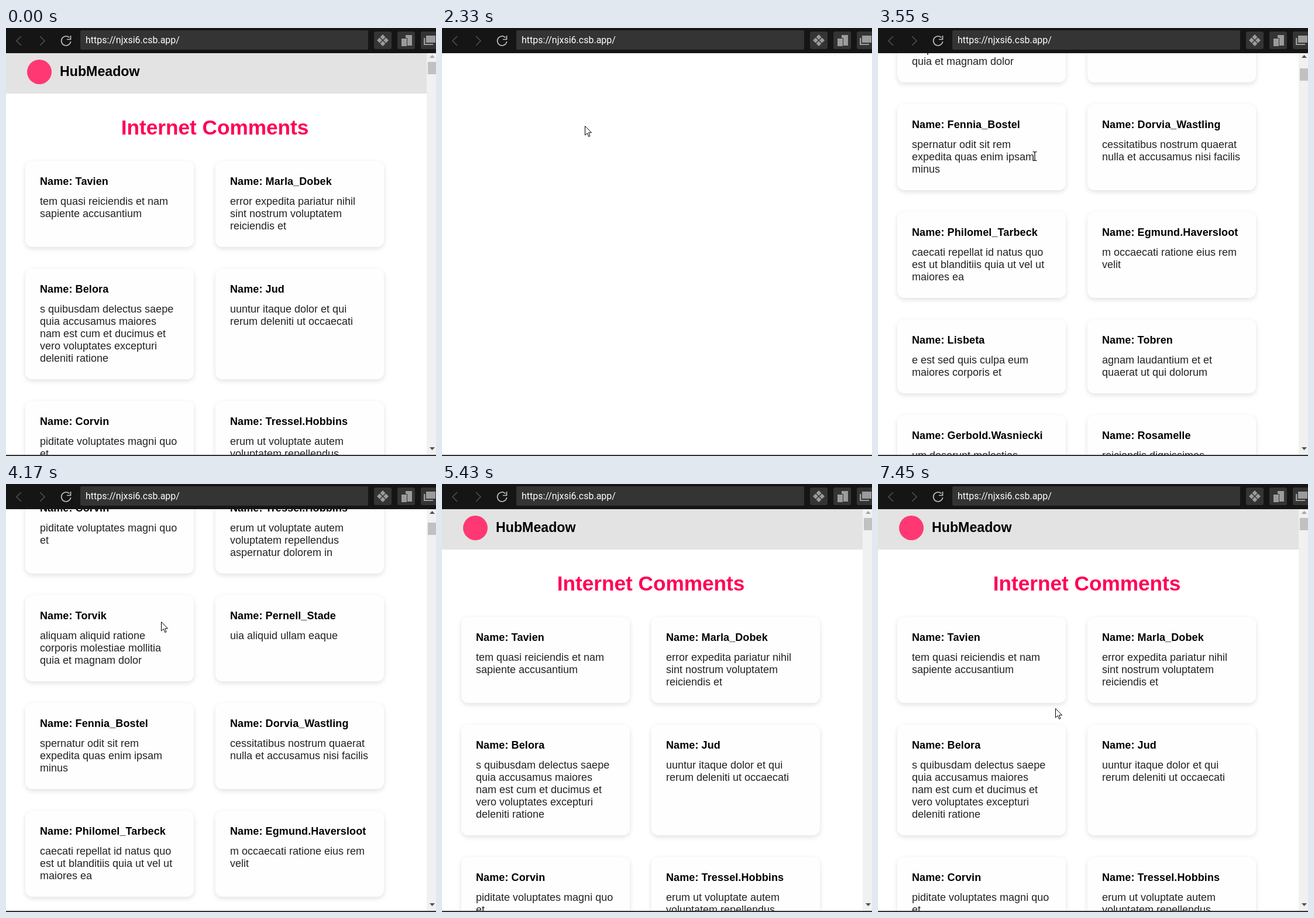
These frames come from a looping animation (735x731 px, 8000 ms). An HTML page:

```html
<!DOCTYPE html>
<html lang="en">
<head>
<meta charset="utf-8">
<style>
html, body { margin: 0; width: 100%; height: 100%; overflow: hidden; background: #333; }
body { position: relative; font: 18px/21px "Liberation Sans", Arial, sans-serif; }
#bar { position: absolute; left: 0; top: 0; }
#view { position: absolute; top: 43px; width: 735px; height: 686px; overflow: hidden; background: #fff; }
#page { position: absolute; width: 735px; }
header { position: absolute; width: 100%; height: 69px; background: #e3e3e3; }
header i { position: absolute; left: 36px; top: 11px; width: 42px; height: 42px; border-radius: 50%; background: #ff3874; }
header b { position: absolute; left: 92px; top: 18px; font-size: 23.2px; line-height: 26px; }
h1 { position: absolute; top: 107px; left: 196.7px; margin: 0; font-size: 35.2px; line-height: 40px; color: #ff0055; white-space: nowrap; }
#cards { position: absolute; left: 33px; top: 184px; display: grid; grid-template-columns: 288px 288px; gap: 37px; padding-bottom: 37px; }
.card { padding: 25px; box-sizing: border-box; border-radius: 12px; background: #fefefe; box-shadow: 0 3px 9px rgba(0,0,0,.12); white-space: pre; color: #222; }
.card b { display: block; margin-bottom: 13px; color: #000; letter-spacing: .1px; }
#scroll { position: absolute; left: 719px; top: 0; }
#cursor { position: absolute; left: 0; top: 0; overflow: visible; }
</style>
</head>
<body>
<div id="view">
  <div id="page">
    <header><i></i><b>HubMeadow</b></header>
    <h1>Internet Comments</h1>
    <div id="cards"></div>
  </div>
  <svg id="scroll" width="16" height="686">
    <path fill="#f1f1f1" d="M0 0h16v686H0z"/>
    <path id="up" d="M5 8h9L9.5 3z"/>
    <path fill="#505050" d="M5 673h9l-4.5 5z"/>
    <rect id="thumb" x="2" width="14" height="21" fill="#c1c1c1"/>
  </svg>
  <svg id="cursor" width="14" height="20">
    <path id="arrow" fill="#fff" stroke="#000" d="M.5.5V16l3.8-3.4 2.5 5.9 2.2-1-2.4-5.7h4.9z"/>
    <path id="beam" fill="none" stroke="#000" stroke-width="1.2" d="M-3.5-7.5h2.5l1 1 1-1h2.5M0-7V7M-3.5 7.5h2.5l1-1 1 1h2.5"/>
  </svg>
</div>
<svg id="bar" width="735" height="43">
  <path fill="#151515" d="M0 0h735v43H0z"/>
  <g fill="none" stroke="#4d4d4d" stroke-width="1.7">
    <path d="M26 14l-8 8 8 8M58 14l8 8-8 8"/>
    <path stroke="#bdbdbd" d="M108.5 16.5A8 8 0 1 0 110.6 23M110.5 13v6.5H104"/>
  </g>
  <rect x="127" y="4" width="492" height="33" rx="2" fill="#343434"/>
  <text x="136" y="26" font-family="Roboto, sans-serif" font-size="16" fill="#fff">https://njxsi6.csb.app/</text>
  <g fill="#343434">
    <rect x="629" y="6" width="30" height="30" rx="3"/>
    <rect x="669" y="6" width="30" height="30" rx="3"/>
    <rect x="709" y="6" width="30" height="30" rx="3"/>
  </g>
  <g fill="#9b9b9b">
    <path d="M644 11l4.5 4.5L644 20l-4.5-4.5zM644 22l4.5 4.5L644 31l-4.5-4.5zM638.500 16.500l4.5 4.500-4.500 4.500-4.500-4.500zM649.500 16.500l4.500 4.500-4.500 4.500-4.500-4.500z"/>
    <path d="M683 12h11v18h-8V17h-3zM676 18h9v13h-9zM718 13h16v12h-16zM714 17h2.500v10H730v2h-16z"/>
  </g>
</svg>
<script>
const $ = id => document.getElementById(id);

const comments = [
  ["Tavien", "tem quasi reiciendis et nam\nsapiente accusantium"],
  ["Marla_Dobek", "error expedita pariatur nihil\nsint nostrum voluptatem\nreiciendis et"],
  ["Belora", "s quibusdam delectus saepe\nquia accusamus maiores\nnam est cum et ducimus et\nvero voluptates excepturi\ndeleniti ratione"],
  ["Jud", "uuntur itaque dolor et qui\nrerum deleniti ut occaecati"],
  ["Corvin", "piditate voluptates magni quo\net"],
  ["Tressel.Hobbins", "erum ut voluptate autem\nvoluptatem repellendus\naspernatur dolorem in"],
  ["Torvik", "aliquam aliquid ratione\ncorporis molestiae mollitia\nquia et magnam dolor"],
  ["Pernell_Stade", "uia aliquid ullam eaque"],
  ["Fennia_Bostel", "spernatur odit sit rem\nexpedita quas enim ipsam\nminus"],
  ["Dorvia_Wastling", "cessitatibus nostrum quaerat\nnulla et accusamus nisi facilis"],
  ["Philomel_Tarbeck", "caecati repellat id natus quo\nest ut blanditiis quia ut vel ut\nmaiores ea"],
  ["Egmund.Haversloot", "m occaecati ratione eius rem\nvelit"],
  ["Lisbeta", "e est sed quis culpa eum\nmaiores corporis et"],
  ["Tobren", "agnam laudantium et et\nquaerat ut qui dolorum"],
  ["Gerbold.Wasniecki", "um deserunt molestias\nquia et natus dolor\nest ut"],
  ["Rosamelle", "reiciendis dignissimos\nnostrum et quaerat"],
];
$("cards").innerHTML = comments.map(([name, text]) =>
  `<div class="card"><b>Name: ${name}</b>${text}</div>`).join("");

// Keys: [time, value...]; the pointer is hidden while it is over the toolbar.
const pointer = [
  [0, 103, 22], [70, 105, 30], [400, 549, 570], [760, 240, 132], [890, 240, 132],
  [1660, 103, 22], [1990, 103, 30], [2330, 244, 167], [3200, 244, 167],
  [3550, 268, 219], [3680, 268, 219], [3890, 265, 235], [4240, 265, 235],
  [4450, 219, 142], [4520, 219, 142], [4870, 106, 110], [5200, 103, 22],
  [7050, 103, 22], [7450, 303, 383], [8000, 303, 383],
];
const scrolling = [
  [0, 0], [3170, 0], [3550, 875], [3680, 875], [3890, 960], [4090, 960],
  [4170, 631], [4240, 631], [4400, 0], [8000, 0],
];

function at(keys, t) {
  const i = keys.findIndex(k => k[0] > t);
  const a = keys[i - 1], b = keys[i];
  const p = (t - a[0]) / (b[0] - a[0]);
  return a.slice(1).map((v, n) => v + (b[n + 1] - v) * p);
}
const within = (t, ...spans) => spans.some(([a, b]) => t >= a && t < b);
const show = (id, on) => $(id).style.display = on ? "" : "none";

function draw(now) {
  const t = now % 8000;
  const blank = within(t, [2150, 2660], [6430, 6890]);
  const loaded = !within(t, [2150, 2930], [6430, 7090]);
  const beam = within(t, [3480, 3850], [4400, 4620]);
  const [x, y] = at(pointer, t);
  const top = Math.round(at(scrolling, t)[0]);

  show("page", !blank);
  show("cards", loaded);
  show("scroll", loaded);
  show("arrow", !beam);
  show("beam", beam);
  $("page").style.top = -top + "px";
  document.querySelector("h1").style.left = (loaded ? 196.7 : 204.7) + "px";
  $("thumb").setAttribute("y", 15 + top * 0.0126);
  $("up").setAttribute("fill", top ? "#505050" : "#a3a3a3");
  $("cursor").style.transform = `translate(${Math.round(x)}px, ${Math.round(y) - 43}px)`;
  $("cursor").style.visibility = y < 43 ? "hidden" : "visible";
  requestAnimationFrame(draw);
}
requestAnimationFrame(draw);
</script>
</body>
</html>
```
